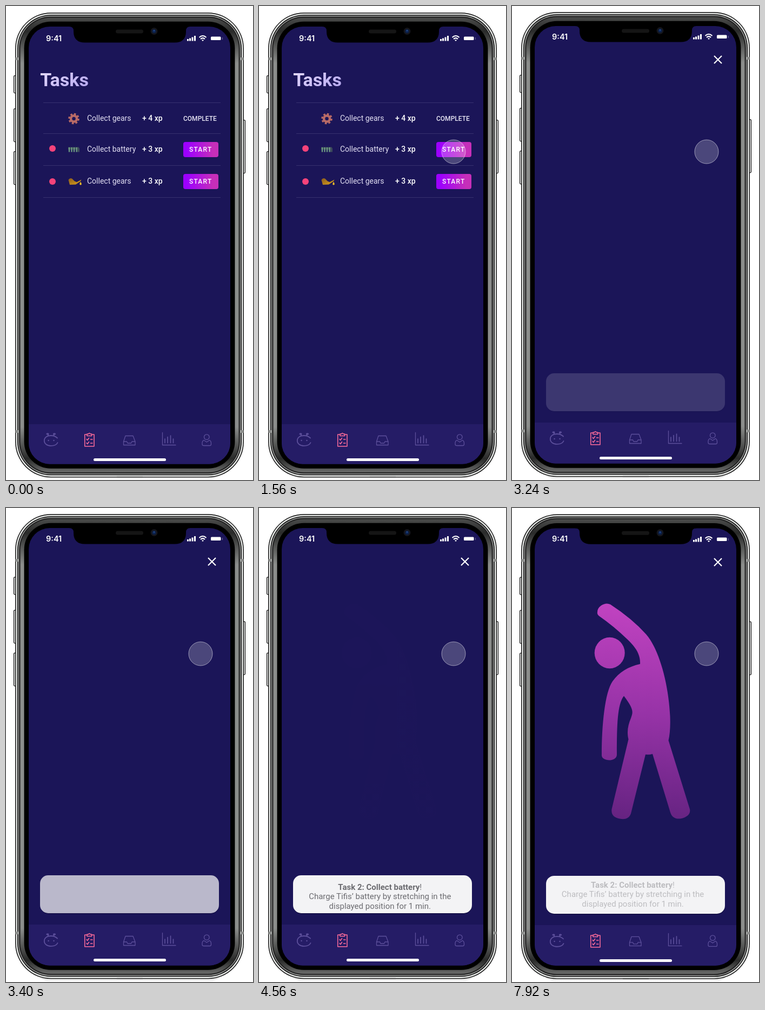
An HTML page that plays this animation: 457x875 px, repeating every 8000 ms.

```html
<!DOCTYPE html>
<html lang="en">
<head>
<meta charset="utf-8">
<title>Task screen</title>
<style>
html, body { margin: 0; width: 100%; height: 100%; overflow: hidden; background: #fff; }
svg { display: block; width: 457px; height: 875px; }
text { font-family: Roboto, sans-serif; }
.icon { fill: none; stroke: #5c4f9b; stroke-width: 1.3; stroke-linejoin: round; stroke-linecap: round; }
.active { stroke: #ff6c9b; stroke-width: 1.5; }
.button { font-size: 12px; font-weight: 500; letter-spacing: 1.25px; fill: #fff; }
#message { font-size: 15px; fill: #616166; text-anchor: middle; }
</style>
</head>
<body>
<svg viewBox="0 0 457 875">
  <defs>
    <linearGradient id="rim" x2="0" y2="1">
      <stop stop-color="#4a4b4a"/><stop offset=".03" stop-color="#2a2b2a"/>
      <stop offset=".1" stop-color="#8c8e8c"/><stop offset=".9" stop-color="#8c8e8c"/>
      <stop offset=".97" stop-color="#2a2b2a"/><stop offset="1" stop-color="#6a6b6a"/>
    </linearGradient>
    <linearGradient id="purple">
      <stop offset=".1" stop-color="#9c00ff"/><stop offset=".85" stop-color="#c62fb9"/>
    </linearGradient>
    <linearGradient id="lavender" x2="1" y2=".7">
      <stop stop-color="#e6dcff"/><stop offset="1" stop-color="#b9abf0"/>
    </linearGradient>
    <linearGradient id="bodyFill" gradientUnits="userSpaceOnUse" x1="235" y1="178" x2="212" y2="576">
      <stop stop-color="#c143c1"/><stop offset=".5" stop-color="#9733a7"/><stop offset="1" stop-color="#652381"/>
    </linearGradient>
    <linearGradient id="gold" x2="1" y2="1">
      <stop stop-color="#8a5a1c"/><stop offset="1" stop-color="#e0a51c"/>
    </linearGradient>
    <linearGradient id="ground" x2="0" y2="1">
      <stop stop-color="#ddd"/><stop offset="1" stop-color="#fff"/>
    </linearGradient>
    <clipPath id="screen"><rect x="42" y="38" width="373" height="807.500" rx="39"/></clipPath>
  </defs>

  <path d="M62 867H396L380 875H78Z" fill="url(#ground)"/>

  <g id="phone">
    <g fill="#eee" stroke="#111" stroke-width="1.3">
      <rect x="14.600" y="128.600" width="6" height="32" rx="1.500"/>
      <rect x="14.600" y="189.600" width="6" height="61" rx="1.500"/>
      <rect x="14.600" y="268.600" width="6" height="61" rx="1.500"/>
      <rect x="436.400" y="210.600" width="6" height="98" rx="1.500"/>
    </g>
    <g id="shell"></g>
    <path d="M17.500 97.500H23M434 97.500H439.500M17.500 785.500H23M434 785.500H439.500" stroke="#8f918f" stroke-width="5"/>
    <path d="M205 869.500H253" stroke="#333" stroke-width="1.500"/>

    <g clip-path="url(#screen)">
      <rect x="42" y="38" width="373" height="808" fill="#1b1558"/>
      <g id="ui">
        <text x="74" y="64.500" fill="#fff" style="font:600 14.500px Inter,sans-serif">9:41</text>
        <path d="M336.500 64.500V61M340.500 64.500V59.500M345 64.500V57.500M349.500 64.500V55" stroke="#fff" stroke-width="3"/>
        <g fill="none" stroke="#fff" stroke-width="2">
          <path d="M357.500 58Q364 52 370.500 58M360 61Q364 57.200 368 61"/>
          <path d="M364 65L362 63Q364 61.300 366 63Z" fill="#fff" stroke="none"/>
        </g>
        <rect x="379" y="56.500" width="18.500" height="6.500" rx="1.500" fill="#fff"/>
        <path d="M400.500 58V62" stroke="#6a6694"/>

        <g id="tasks">
          <text x="63.300" y="148" font-size="34" font-weight="700" fill="url(#lavender)">Tasks</text>
          <path d="M69 178.500H397M69 235.500H397M69 294.500H397M69 353.500H397" stroke="#37316f"/>
          <g id="rows"></g>
          <g transform="translate(125.500 208)" fill="none" stroke="#b86a66">
            <circle r="5.500" stroke-width="4.500"/>
            <circle r="8.700" stroke-width="3.200" stroke-dasharray="3.600 3.233"/>
          </g>
          <path d="M115 260.500H134.500L136 263V269.500H132V265H115Z" fill="#3c4a5c"/>
          <path d="M117 261V269.500M121.500 261V269.500M126 261V269.500M130.500 261V269.500" stroke="#6f9c83" stroke-width="2.300"/>
          <path d="M115.500 321Q118 316.500 122 318.500L127 323.500L131 325L139.500 320.500L138 323.500L129 329.500L118 330Z" fill="url(#gold)"/>
          <path d="M138 324.500Q141.500 330 138 330.500Q134.500 330 138 324.500Z" fill="#f5bf28"/>
        </g>

        <rect x="42" y="772" width="373" height="84" fill="#251c66"/>
        <g class="icon">
          <path d="M95 797.500C92 794.500 88 793 83 793C75.500 793 70.800 797 70.800 802.200C70.800 808 76 811.800 83 811.800C89.500 811.800 94 809.500 95.500 806M78 793V790M88.500 793V790" stroke-width="1.800"/>
          <g fill="#5c4f9b">
            <ellipse cx="77" cy="790" rx="2" ry="1"/><ellipse cx="89.500" cy="790" rx="2" ry="1"/>
            <circle cx="78.500" cy="802" r=".6"/><circle cx="88.500" cy="802" r=".6"/>
          </g>
          <path d="M221 793.500H235L239 804V810.500H217.500V804ZM217.500 804H223.500L225 807H231.500L233 804H239"/>
          <path d="M289.500 787.500V810.500H314"/>
          <path d="M294 799V806.500M299 795.500V806.500M304.500 793V806.500M309.500 799V806.500" stroke-width="1.700"/>
          <circle cx="371.300" cy="795.700" r="4.800"/>
          <path d="M366 801.500Q363 803 363 807V809Q363 811.500 366 811.500H377Q379.500 811.500 379.500 809V807Q379.500 803 376.500 801.500L371.300 805Z"/>
        </g>
        <path class="icon active" d="M150 791H145.700V812.700H163V791H158.500M150 790H152.500Q154.300 787 156 790H158.500V793.500H150ZM149 799.500L150.700 801.500L153.500 797.500M149 806.500L150.700 808.500L153.500 804.500M156.500 800H160M156.500 807H160"/>
        <rect x="162" y="835" width="134" height="5" rx="2.500" fill="#fff"/>

        <path id="close" d="M374 95L388 109M388 95L374 109" stroke="#fff" stroke-width="2.200"/>
        <g id="card">
          <rect x="63.500" y="683" width="330.500" height="69.500" rx="15" fill="#0d0a30" opacity=".55"/>
          <rect x="63" y="681" width="331" height="70" rx="15" fill="#f3f3f5"/>
        </g>
        <g id="message">
          <text x="223.500" y="703"><tspan font-weight="700">Task 2: Collect battery</tspan>!</text>
          <text x="223.500" y="720.500">Charge Tifis’ battery by stretching in the</text>
          <text x="223.500" y="738">displayed position for 1 min.</text>
        </g>
      </g>
    </g>

    <path d="M117 36V38Q125 38 125 46V47Q125 67.500 146 67.500H312Q333 67.500 333 47V46Q333 38 341 38V36Z" fill="#000"/>
    <rect x="203" y="43.500" width="51" height="7" rx="3.500" fill="#151515"/>
    <circle cx="274" cy="46.500" r="6.500" fill="#15161c"/>
    <circle cx="274" cy="46.500" r="3.500" fill="#0c2350"/>
    <circle cx="274" cy="45.500" r="1.300" fill="#2a508c"/>
  </g>

  <g id="figure" fill="url(#bodyFill)">
    <ellipse cx="180.700" cy="267.500" rx="28" ry="28.700"/>
    <path d="M158 192Q158 185 165 180Q174 174 182 178Q222 204 248 233C272 260 290 325 292.500 385Q293.500 412 289.500 429L329 556C331 566 322 571 314 573C304 575 296 572 293 562L260 454Q254 456 247 455L220 564C216 575 207 575 199 573.500C190 572 183 567 184.500 556L215.500 427C212 412 215 400 220 388C224 377 226 372 207 347C195 362 194 400 194 455C194 463 186 465.500 180 465.500C172 465 165 462 166 455C166 400 172 340 186 320C198 303 215 293 237 288C238 270 228 256 213 242Q188 218 162 200Q157 197 158 192Z"/>
  </g>

  <circle id="cursor" r="22" fill="#fff" fill-opacity=".21" stroke="#fff" stroke-opacity=".5"/>
</svg>

<script>
const $ = id => document.getElementById(id);
const LOOP = 8000;

// Nested bands of the phone frame: inset from the outer edge, fill
$("shell").innerHTML = [
  [0, "#0a0a0a"], [1.4, "#e2e4e2"], [4, "#141414"], [5.8, "#b9bbb9"], [7, "#262626"],
  [9.5, "url(#rim)"], [16.5, "#000"]
].map(([d, fill]) =>
  `<rect x="${17 + d}" y="${12.3 + d}" width="${423 - 2 * d}" height="${858 - 2 * d}" rx="${66 - d}" fill="${fill}"/>`
).join("");

const row = (y, name, xp, done) => `
  <text x="150" y="${y}" font-size="14" fill="#e2dff3">${name}</text>
  <text x="252" y="${y}" font-size="14" font-weight="500" fill="#fff">+ ${xp} xp</text>` + (done
  ? `<text x="328" y="${y}" font-size="12" font-weight="500" fill="#e8e6f5">COMPLETE</text>`
  : `<circle cx="86" cy="${y < 300 ? 263 : 324}" r="6" fill="#f7437a"/>
     <rect x="328" y="${y - 18}" width="65" height="28" rx="4" fill="url(#purple)"/>
     <text class="button" x="339" y="${y}">START</text>`);
$("rows").innerHTML = row(212, "Collect gears", 4, true) + row(269, "Collect battery", 3) + row(328, "Collect gears", 3);

const span = (t, from, to) => Math.min(1, Math.max(0, (t - from) / (to - from)));
const inOut = p => p < .5 ? 2 * p * p : 1 - 2 * (1 - p) ** 2;
const out = p => 1 - (1 - p) ** 2;
const bezier = (a, b, c, p) => (1 - p) ** 2 * a + 2 * p * (1 - p) * b + p * p * c;
const move = (id, x, y) => $(id).setAttribute("transform", `translate(${x} ${y})`);
const fade = (id, value) => $(id).setAttribute("opacity", value);

function draw(t) {
  const detail = inOut(span(t, 2200, 2720));
  const leaving = span(t, 7280, 7940);
  const lift = detail - leaving / 3;
  move("phone", 0, -lift);
  move("ui", 0, -2 * lift);
  fade("tasks", 1 - detail);
  fade("close", detail);
  fade("card", inOut(span(t, 3120, 3560)));

  const rise = out(span(t, 3720, 4880));
  move("message", 4 * (1 - rise), 61 * (1 - rise));
  fade("message", rise * (1 - .65 * leaving));

  fade("figure", inOut(span(t, 4480, 5800)));

  const p = inOut(span(t, 440, 1560));
  move("cursor", bezier(482, 423, 360, p), bezier(118, 221, 269, p));
  fade("cursor", t < 480 ? 0 : 1);
}

const start = performance.now();
function tick() {
  draw((performance.now() - start) % LOOP);
  requestAnimationFrame(tick);
}
tick();
</script>
</body>
</html>
```
